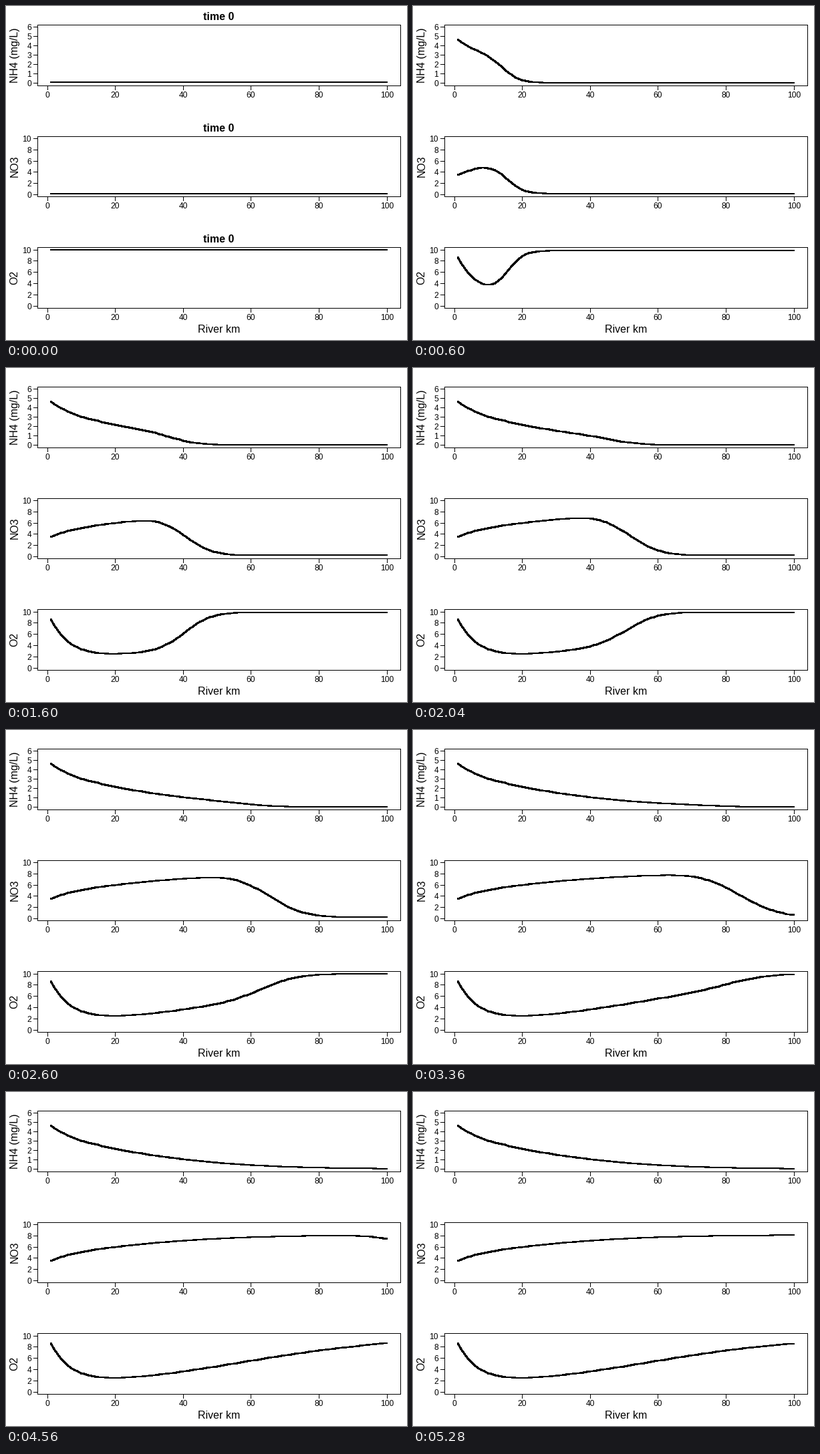
These frames come from a looping animation (600x500 px, 6.04 s). A matplotlib script:

```python
import numpy as np
import matplotlib.pyplot as plt
from matplotlib.animation import FuncAnimation

plt.rcParams["font.family"] = "Liberation Sans"
plt.rcParams["path.simplify"] = False

W, H, DPI = 600, 500, 100
STEP_MS, LOOP_MS = 40, 6040
LAST = 132              # the simulation ends here and the picture holds
PT = 72 / DPI           # points per pixel

# River model: upwind transport at 1 km per step, nitrification, reaeration
BOXES = 100
INFLOW = np.array([4.91, 3.20, 9.78])     # NH4, NO3, O2
START = np.array([0.1, 0.1, 10.0])
RATE, HALF_SAT = 0.0845, 3.8
AERATION, O2_SAT, O2_PER_N = 0.044, 10.0, 4.57


def change(c):
    upstream = np.column_stack([INFLOW, c[:, :-1]])
    nh4, _, o2 = c
    nitrif = RATE * nh4 * o2 / (o2 + HALF_SAT)
    gain = AERATION * (O2_SAT - o2) - O2_PER_N * nitrif
    return upstream - c + np.array([-nitrif, nitrif, gain])


def simulate(steps, sub=5):
    c = np.repeat(START[:, None], BOXES, axis=1)
    h = 1 / sub
    states = [c]
    for _ in range(steps):
        for _ in range(sub):
            k1 = change(c)
            k2 = change(c + h / 2 * k1)
            k3 = change(c + h / 2 * k2)
            k4 = change(c + h * k3)
            c = c + h / 6 * (k1 + 2 * k2 + 2 * k3 + k4)
        states.append(c)
    return states


states = simulate(LAST)

# Page layout in pixels, y pointing down
LEFT, RIGHT = 47, 590
TOP, BOTTOM, PITCH = 28.5, 119.2, H / 3
TICK = 6

fig = plt.figure(figsize=(W / DPI, H / DPI), dpi=DPI, facecolor="white")
ax = fig.add_axes([0, 0, 1, 1])
ax.set_xlim(0, W)
ax.set_ylim(H, 0)
ax.axis("off")


def km_to_x(km):
    return 67.2 + (np.asarray(km) - 1) * 5.079


def stroke(xs, ys, width=1):
    line, = ax.plot(xs, ys, color="black", lw=width * PT, antialiased=False,
                    snap=False, solid_capstyle="projecting",
                    solid_joinstyle="miter")
    return line


def label(x, y, text, size, **kw):
    kw = {"ha": "center", "va": "baseline", **kw}
    return ax.text(x, y, text, fontsize=size * PT, color="black", **kw)


class Panel:
    def __init__(self, row, name, top_value, tick_step):
        shift = row * PITCH
        self.zero = BOTTOM - 3.36 + shift
        self.scale = 84 / top_value
        top, bottom = int(TOP + shift), int(BOTTOM + shift)
        mid = (top + bottom) / 2

        stroke(np.array([LEFT, RIGHT, RIGHT, LEFT, LEFT]) + 0.5,
               np.array([top, top, bottom, bottom, top]) + 0.5)
        for km in range(0, 101, 20):
            x = int(km_to_x(km))
            stroke([x + 0.5] * 2, [bottom + 0.5, bottom + TICK])
            label(x, bottom + 18, str(km), 12)
        for value in range(0, top_value + 1, tick_step):
            y = int(self.to_y(value))
            stroke([LEFT - TICK + 1, LEFT + 0.5], [y + 0.5] * 2)
            label(38, y + 5, str(value), 12, ha="right")

        label(19, mid, name, 16, rotation=90, ha="right", va="center").set(
            ha="center", x=13 if "(" not in name else 14)
        self.title = label(318.5, top - 7, "time 0", 16, weight="bold")
        self.curve = stroke([], [], 2)
        self.curve.set(solid_capstyle="round", solid_joinstyle="round")

    def to_y(self, value):
        return self.zero - self.scale * value

    def show(self, values, titled):
        x = np.floor(km_to_x(np.arange(1, BOXES + 1)))
        self.curve.set_data(x, np.floor(self.to_y(values)))
        self.title.set_visible(titled)


panels = [Panel(0, "NH4 (mg/L)", 6, 1),
          Panel(1, "NO3", 10, 2),
          Panel(2, "O2", 10, 2)]
label(319, 489, "River km", 16)


def draw(i):
    for panel, values in zip(panels, states[min(i, LAST)]):
        panel.show(values, titled=i == 0)
    return [p.curve for p in panels] + [p.title for p in panels]


anim = FuncAnimation(fig, draw, frames=LOOP_MS // STEP_MS, interval=STEP_MS,
                     init_func=lambda: draw(0), repeat=True, repeat_delay=0)
plt.show()
```
